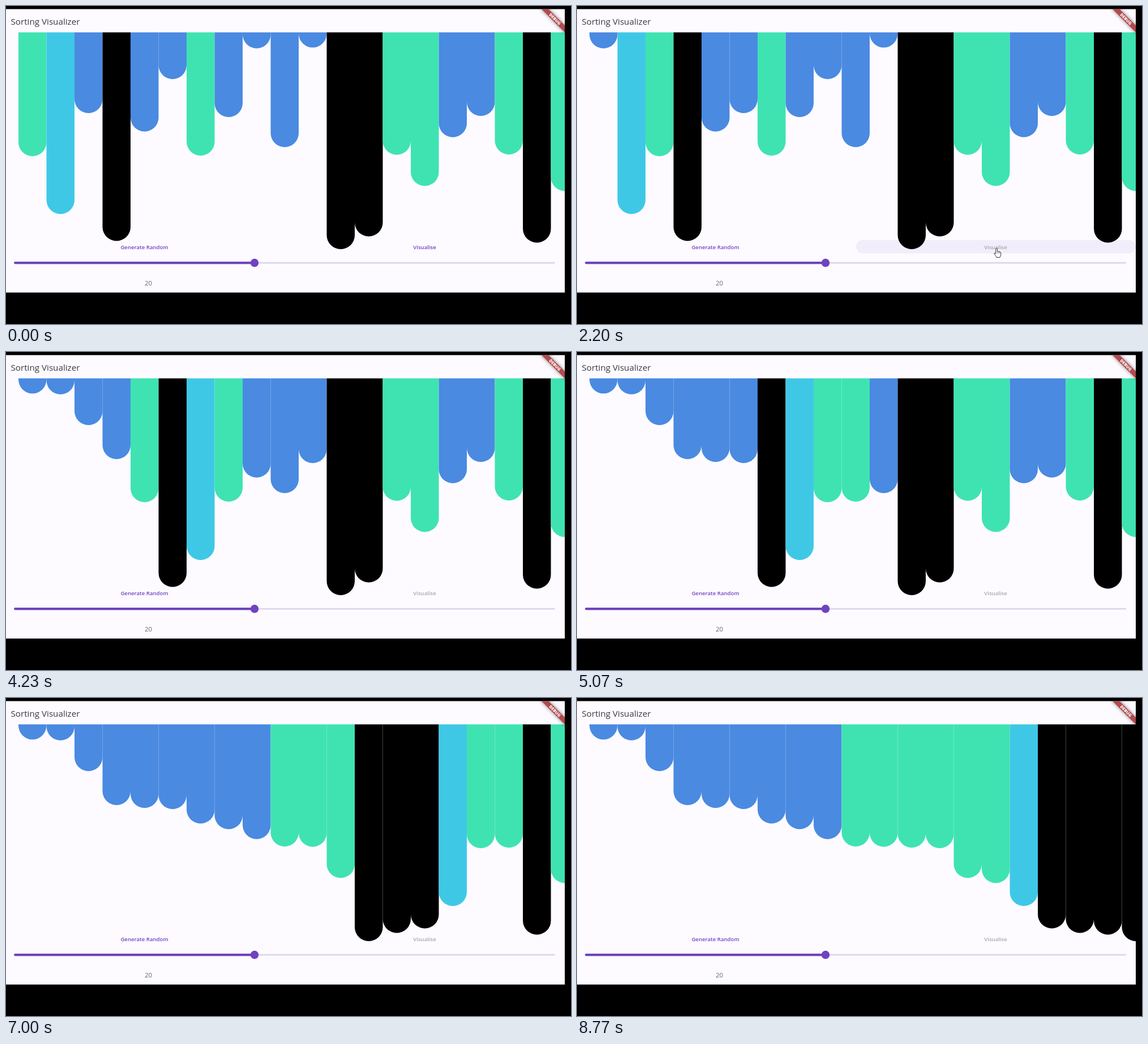
These frames come from a looping animation (998x561 px, 9260 ms). An HTML page with a canvas:

```html
<!DOCTYPE html>
<html lang="en">
<head>
<meta charset="utf-8">
<title>Sorting Visualizer</title>
<style>
  html, body { margin: 0; width: 100%; height: 100%; overflow: hidden; background: #000; }
  canvas { display: block; }
</style>
</head>
<body>
<canvas id="stage" width="998" height="561"></canvas>
<script>
const ctx = document.getElementById('stage').getContext('2d');
const LOOP = 9260;
const WINDOW = { x: 0, y: 5.5, w: 987, h: 500 };
const BAR = { x: 22, top: 46.5, w: 49.5 };
const PRIMARY = '#6f43c0', BACKGROUND = '#fdfbff';
const FONT = '"Open Sans", "Noto Sans", sans-serif';
const SORT_START = 1930;

// Bottom edge of each bar before sorting.
const BOTTOMS = [265, 367, 189, 414.5, 221.5, 129, 264, 196, 74.7, 249,
                 73.3, 429, 406.5, 262.5, 317.5, 231.5, 194, 262, 417.5, 326.5];

// [time, comparisons done]
const PROGRESS = [[SORT_START, 0], [2200, 8.6], [5070, 98.3], [6300, 135.5], [7000, 158.5], [8000, 190]];

// [time, x, y] of the pointer
const POINTER = [[850, 716, 512], [1080, 728, 474], [1350, 741, 428], [2680, 741, 428],
                 [2930, 738, 440], [3250, 726, 472], [3560, 718.5, 497.5], [3620, 718.5, 497.5], [3760, 717, 514]];

const clamp01 = v => Math.max(0, Math.min(1, v));

// Linear interpolation through keys whose first entry is the time.
function track(keys, t) {
  if (t <= keys[0][0]) return keys[0].slice(1);
  for (let i = 1; i < keys.length; i++) {
    const [a, b] = [keys[i - 1], keys[i]];
    if (t < b[0]) {
      const p = (t - a[0]) / (b[0] - a[0]);
      return a.slice(1).map((v, n) => v + (b[n + 1] - v) * p);
    }
  }
  return keys[keys.length - 1].slice(1);
}

// Exchange sort, stopped after the given number of comparisons.
function exchangeSort(values, comparisons) {
  const a = values.slice();
  for (let i = 0; i < a.length; i++) {
    for (let j = i + 1; j < a.length; j++) {
      if (comparisons-- <= 0) return a;
      if (a[j] < a[i]) [a[i], a[j]] = [a[j], a[i]];
    }
  }
  return a;
}

function barColor(bottom) {
  if (bottom > 400) return '#000';
  if (bottom > 340) return '#3fc8e6';
  if (bottom > 255) return '#3fe3b2';
  return '#4a8ae1';
}

function fillRound(x, y, w, h, radii, color) {
  ctx.fillStyle = color;
  ctx.beginPath();
  ctx.roundRect(x, y, w, h, radii);
  ctx.fill();
}

function text(str, x, y, size, weight, color, align = 'center') {
  ctx.font = `${weight} ${size}px ${FONT}`;
  ctx.textAlign = align;
  ctx.fillStyle = color;
  ctx.fillText(str, x, y);
}

function drawBars(t) {
  const done = Math.floor(track(PROGRESS, t)[0]);
  const r = BAR.w / 2;
  exchangeSort(BOTTOMS, done).forEach((bottom, i) =>
    fillRound(BAR.x + i * BAR.w, BAR.top, BAR.w, bottom - BAR.top, [0, 0, r, r], barColor(bottom)));
}

function drawHighlight(t) {
  const alpha = 0.075 * clamp01((t - 1300) / 100) * clamp01((2880 - t) / 150);
  if (alpha > 0) fillRound(493, 413, 494, 23.5, 11.7, `rgba(111, 67, 192, ${alpha})`);
}

function drawControls(t) {
  text('Generate Random', 244.5, 428.5, 9.6, 600, PRIMARY);
  text('Visualise', 739.5, 428.5, 9.6, 600, t < SORT_START ? PRIMARY : '#a9a6aa');
  fillRound(439, 451.8, 531, 2.6, 1.3, '#ddd5f0');
  fillRound(14, 451, 425, 4.2, 2.1, PRIMARY);
  fillRound(431.7, 445.8, 14.6, 14.6, 7.3, PRIMARY);
  text('20', 251.5, 493, 11.4, 400, '#68655f');
}

function drawBanner() {
  ctx.save();
  ctx.translate(WINDOW.w, WINDOW.y);
  ctx.rotate(Math.PI / 4);
  ctx.scale(0.725, 0.725);
  ctx.shadowColor = 'rgba(0, 0, 0, 0.5)';
  ctx.shadowBlur = 6;
  ctx.fillStyle = '#b34a4c';
  ctx.fillRect(-42, 28, 84, 12);
  ctx.shadowColor = 'transparent';
  text('DEBUG', 0, 37.6, 10.2, 800, '#fff');
  ctx.restore();
}

function outline(points) {
  ctx.beginPath();
  points.forEach(([x, y]) => ctx.lineTo(x, y));
  ctx.closePath();
  ctx.fillStyle = '#fff';
  ctx.strokeStyle = '#222';
  ctx.lineWidth = 0.9;
  ctx.lineJoin = 'round';
  ctx.fill();
  ctx.stroke();
}

function drawHand() {
  outline([[-1.3, -0.5], [0, -1.2], [1.3, -0.3], [1.3, 5], [3.3, 4.7], [4, 5.5], [6, 5.6], [7.7, 7],
           [7.7, 11], [6, 15.5], [0, 15.5], [-1.5, 12.5], [-4.3, 9], [-3.4, 7.6], [-1.3, 9]]);
  ctx.beginPath();
  for (const x of [1.5, 3.7, 5.8]) {
    ctx.moveTo(x, 5.5);
    ctx.lineTo(x, 8.5);
  }
  ctx.lineWidth = 0.6;
  ctx.stroke();
}

function drawArrow() {
  outline([[0, 0], [0, 12], [2.8, 9.5], [4.7, 13.5], [6.3, 12.8], [4.6, 9], [8.3, 8.7]]);
}

function drawBeam() {
  ctx.strokeStyle = '#333';
  ctx.lineWidth = 1;
  ctx.beginPath();
  ctx.moveTo(0, -5);
  ctx.lineTo(0, 5);
  for (const y of [-5.5, 5.5]) {
    ctx.moveTo(-2.7, y);
    ctx.lineTo(2.7, y);
  }
  ctx.stroke();
}

function drawPointer(t) {
  if (t < POINTER[0][0] || t > POINTER[POINTER.length - 1][0]) return;
  const [x, y] = track(POINTER, t);
  ctx.save();
  ctx.translate(x, y);
  if (y < 437) drawHand();
  else if (y < 470) drawArrow();
  else drawBeam();
  ctx.restore();
}

function draw(t) {
  ctx.fillStyle = '#000';
  ctx.fillRect(0, 0, 998, 561);
  ctx.save();
  ctx.beginPath();
  ctx.rect(WINDOW.x, WINDOW.y, WINDOW.w, WINDOW.h);
  ctx.clip();
  ctx.fillStyle = BACKGROUND;
  ctx.fillRect(0, 0, 998, 561);
  text('Sorting Visualizer', 8.5, 33, 15.2, 400, '#3b393d', 'left');
  drawHighlight(t);
  drawBars(t);
  drawControls(t);
  drawBanner();
  drawPointer(t);
  ctx.restore();
}

function frame() {
  draw(performance.now() % LOOP);
  requestAnimationFrame(frame);
}
frame();
</script>
</body>
</html>
```
